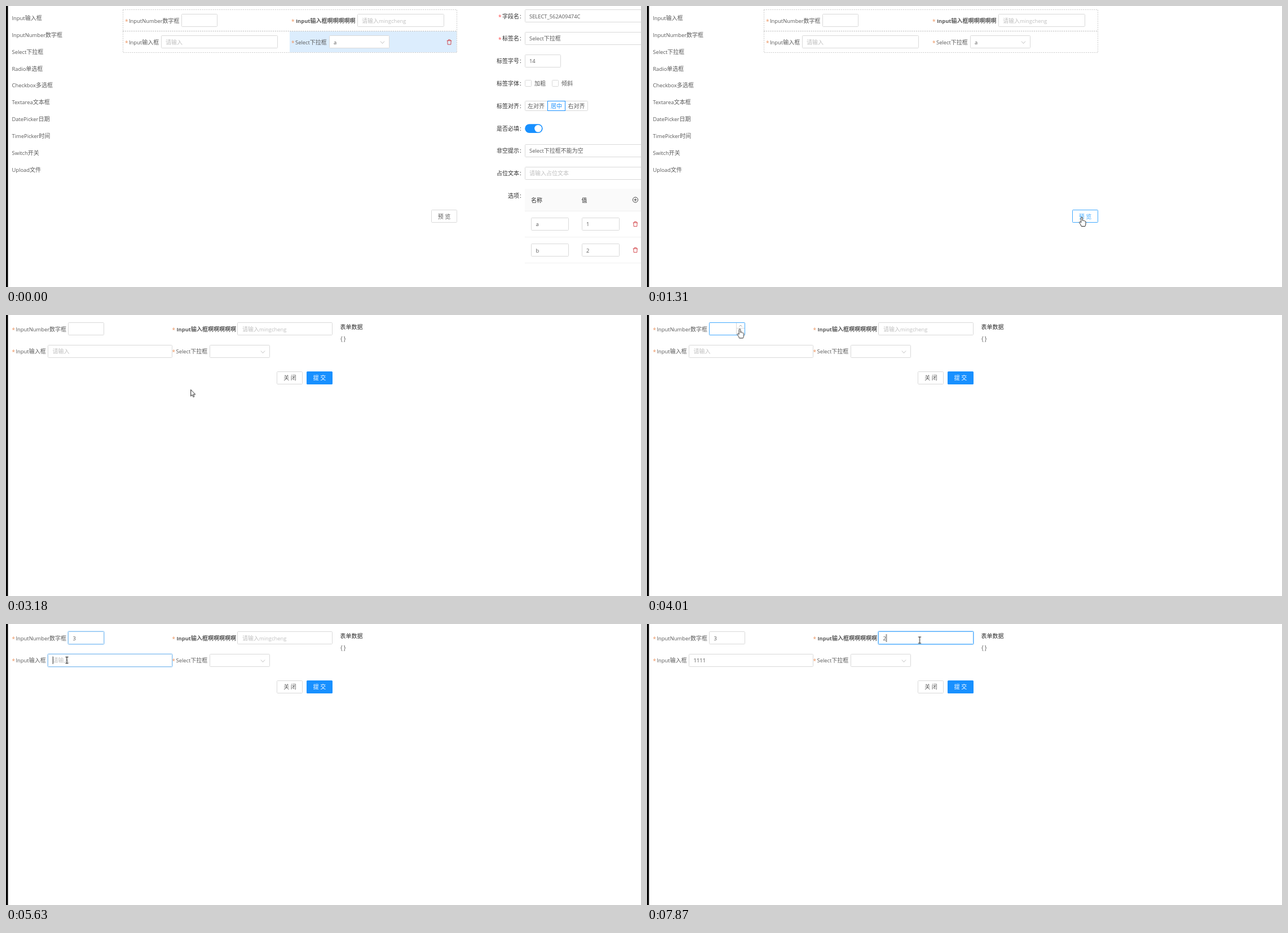
Recreate the animation shown at these times as an HTML page. Size 1126 by 498 pixels, loop 8000 ms.

```html
<!DOCTYPE html>
<html lang="zh-CN">
<head>
<meta charset="utf-8">
<title>Form designer</title>
<style>
html, body { margin: 0; width: 100%; height: 100%; overflow: hidden; background: #fff; }
svg { display: block; width: 1126px; height: 498px; }
text { font: 10px "Open Sans", "Noto Sans CJK SC", "Noto Sans CJK", sans-serif; fill: #595959; white-space: pre; }
.en { font-size: 9.4px; }
.box { fill: #fff; stroke: #d9d9d9; }
.hint { fill: #bfbfbf; }
.bold { font-weight: 700; }
.star { fill: #ec9460; }
.must { fill: #ff4d4f; }
.dark text, .dark { fill: #2c2c2c; }
.end { text-anchor: end; }
.mid { text-anchor: middle; }
.line { fill: none; stroke: #bfbfbf; }
.dash { fill: none; stroke: #cdcdcd; stroke-dasharray: 2.2 1.6; }
.bin { fill: none; stroke: #d0383e; stroke-width: .9; }
.hover { fill: none; stroke: #40a9ff; }
.focus rect { fill: none; stroke: #58b2fc; }
.focus rect + rect { stroke: #1890ff; stroke-opacity: .42; }
.caret { stroke: #333; }

/* One loop is 8 s, so 1% is 80 ms */
.a { animation: 8s step-end -8ms infinite; }
#panel { animation-name: panel; }
#editor { animation-name: editor; }
#preview { animation-name: preview; }
#btnHover { animation-name: btn-hover; }
#numHover { animation-name: num-hover; }
#numFocus { animation-name: num-focus; }
#numCaret { animation-name: num-caret; }
#spin { animation-name: spin; }
#one { animation-name: one; }
#two { animation-name: two; }
#three { animation-name: three; }
#hint1 { animation-name: hint1; }
#hover1 { animation-name: hover1; }
#focus1 { animation-name: focus1; }
#caret1 { animation-name: caret1; }
#key1 { animation-name: key1; }
#key2 { animation-name: key2; }
#key3 { animation-name: key3; }
#key4 { animation-name: key4; }
#hint2 { animation-name: hint2; }
#hover2 { animation-name: hover2; }
#focus2 { animation-name: focus2; }
#caret2 { animation-name: caret2; }
#value2 { animation-name: value2; }
#pointer { animation-name: move; }
#tap { animation-name: tap; }
#arrow { animation-name: arrow; }
#hand { animation-name: hand; }
#beam { animation-name: beam; }

@keyframes panel { 0% { opacity: 1 } 9.875%, 100% { opacity: 0 } }
@keyframes editor { 0% { opacity: 1 } 26.125%, 100% { opacity: 0 } }
@keyframes preview { 0% { opacity: 0 } 26.125%, 100% { opacity: 1 } }
@keyframes btn-hover { 0% { opacity: 0 } 16.375%, 100% { opacity: 1 } }
@keyframes num-hover { 0%, 57.875%, 100% { opacity: 0 } 42.625% { opacity: 1 } }
@keyframes num-focus {
  0%, 100% { opacity: 0 }
  57.875% { opacity: 1 }
  69.375% { opacity: 1; animation-timing-function: linear }
  72.25% { opacity: 0 }
}
@keyframes num-caret { 0%, 69.375%, 100% { opacity: 0 } 57.875% { opacity: 1 } }
@keyframes spin { 0%, 64.625%, 100% { opacity: 0 } 42.625% { opacity: 1 } }
@keyframes one { 0%, 59.75%, 100% { opacity: 0 } 57.875% { opacity: 1 } }
@keyframes two { 0%, 61.75%, 100% { opacity: 0 } 59.75% { opacity: 1 } }
@keyframes three { 0% { opacity: 0 } 61.75%, 100% { opacity: 1 } }
@keyframes hint1 { 0% { opacity: 1 } 75.125%, 100% { opacity: 0 } }
@keyframes hover1 { 0%, 69.375%, 100% { opacity: 0 } 66.5% { opacity: 1 } }
@keyframes focus1 {
  0%, 100% { opacity: 0 }
  69.375% { opacity: .3; animation-timing-function: linear }
  72.25% { opacity: 1 }
  94.5% { opacity: 1; animation-timing-function: linear }
  97.375% { opacity: 0 }
}
@keyframes caret1 {
  0%, 88.75%, 100% { opacity: 0 }
  69.375% { opacity: 1; transform: none }
  75.125% { opacity: 1; transform: translateX(5.3px) }
  78% { opacity: 1; transform: translateX(10.6px) }
  80.125% { opacity: 1; transform: translateX(16px) }
  82% { opacity: 1; transform: translateX(21.3px) }
}
@keyframes key1 { 0% { fill-opacity: 0 } 75.125%, 100% { fill-opacity: 1 } }
@keyframes key2 { 0% { fill-opacity: 0 } 78%, 100% { fill-opacity: 1 } }
@keyframes key3 { 0% { fill-opacity: 0 } 80.125%, 100% { fill-opacity: 1 } }
@keyframes key4 { 0% { fill-opacity: 0 } 82%, 100% { fill-opacity: 1 } }
@keyframes hint2 { 0% { opacity: 1 } 98.375%, 100% { opacity: 0 } }
@keyframes hover2 { 0%, 94.5%, 100% { opacity: 0 } 84.875% { opacity: 1 } }
@keyframes focus2 {
  0% { opacity: 0 }
  94.5% { opacity: .3; animation-timing-function: linear }
  97.375%, 100% { opacity: 1 }
}
@keyframes caret2 {
  0% { opacity: 0; transform: none }
  94.5% { opacity: 1; transform: none }
  98.375%, 100% { opacity: 1; transform: translateX(5.5px) }
}
@keyframes value2 { 0% { opacity: 0 } 98.375%, 100% { opacity: 1 } }

/* The pointer advances in discrete samples, as a screen recorder catches it */
@keyframes move {
  0%, .875% { transform: translate(991px, 446px); animation-timing-function: steps(3) }
  4.125% { transform: translate(643px, 278px) }
  9.625% { transform: translate(643px, 278px); animation-timing-function: steps(7) }
  16.375% { transform: translate(771px, 374px) }
  33% { transform: translate(771px, 374px); animation-timing-function: steps(10) }
  42.625% { transform: translate(137px, 28px) }
  45.625% { transform: translate(137px, 28px); animation-timing-function: steps(5) }
  50.125% { transform: translate(164.5px, 24.5px) }
  53% { transform: translate(164.5px, 24.5px); animation-timing-function: steps(3) }
  56% { transform: translate(166px, 22px) }
  62.625% { transform: translate(166px, 22px); animation-timing-function: steps(5) }
  67.5% { transform: translate(108px, 64px) }
  82% { transform: translate(108px, 64px); animation-timing-function: steps(2) }
  83.875% { transform: translate(454px, 22px) }
  86.75% { transform: translate(454px, 23px) }
  89.625% { transform: translate(454px, 23px); animation-timing-function: steps(2) }
  91.625%, 100% { transform: translate(483.5px, 28.5px) }
}
@keyframes tap {
  0%, 9.875%, 27.125%, 58.875%, 60.75%, 62.625%, 70.375%, 95.5%, 100% { opacity: 0 }
  8.75%, 25.25%, 57.875%, 59.75%, 61.75%, 68.5%, 93.5% { opacity: 1 }
}
@keyframes arrow { 0%, 16.375%, 42.625%, 100% { opacity: 0 } .875%, 27.125% { opacity: 1 } }
@keyframes hand { 0%, 27.125%, 63.625%, 100% { opacity: 0 } 16.375%, 49.25% { opacity: 1 } }
@keyframes beam { 0%, 49.25%, 75.125% { opacity: 0 } 42.625%, 63.625%, 83%, 100% { opacity: 1 } }
</style>
</head>
<body>
<svg viewBox="0 0 1126 498">
  <defs>
    <path id="bin" class="bin" d="M-4.2-2.5H4.2M-3.2-2.5L-2.8 4.2H2.8L3.2-2.5M-1.7-2.5V-4.3H1.7V-2.5"/>
    <path id="chevron" class="line" d="M-3.5-2L0 2L3.5-2"/>
  </defs>
  <rect width="3.5" height="498"/>

  <g id="editor" class="a">
    <text x="10.5" y="25"><tspan class="en">Input</tspan>输入框</text>
    <text x="10.5" y="54.9"><tspan class="en">InputNumber</tspan>数字框</text>
    <text x="10.5" y="84.7"><tspan class="en">Select</tspan>下拉框</text>
    <text x="10.5" y="114.5"><tspan class="en">Radio</tspan>单选框</text>
    <text x="10.5" y="144.4"><tspan class="en">Checkbox</tspan>多选框</text>
    <text x="10.5" y="174.2"><tspan class="en">Textarea</tspan>文本框</text>
    <text x="10.5" y="204.1"><tspan class="en">DatePicker</tspan>日期</text>
    <text x="10.5" y="234"><tspan class="en">TimePicker</tspan>时间</text>
    <text x="10.5" y="263.8"><tspan class="en">Switch</tspan>开关</text>
    <text x="10.5" y="293.6"><tspan class="en">Upload</tspan>文件</text>

    <g id="panel" class="a">
      <rect x="503" y="45" width="296" height="37" fill="#dcedfd"/>
      <use href="#bin" x="786" y="64"/>

      <g class="dark">
        <text class="end" x="910" y="21.5">字段名</text>
        <text class="end" x="910" y="61.3">标签名</text>
        <text class="end" x="910" y="101.1">标签字号</text>
        <text class="end" x="910" y="140.9">标签字体</text>
        <text class="end" x="910" y="180.7">标签对齐</text>
        <text class="end" x="910" y="220.5">是否必填</text>
        <text class="end" x="910" y="260.3">非空提示</text>
        <text class="end" x="910" y="300.1">占位文本</text>
        <text class="end" x="910" y="339.9">选项</text>
        <text y="21.5"><tspan x="911">:</tspan><tspan x="911" dy="39.8">:</tspan><tspan x="911" dy="39.8">:</tspan><tspan x="911" dy="39.8">:</tspan><tspan x="911" dy="39.8">:</tspan><tspan x="911" dy="39.8">:</tspan><tspan x="911" dy="39.8">:</tspan><tspan x="911" dy="39.8">:</tspan><tspan x="911" dy="39.8">:</tspan></text>
      </g>
      <text class="must" x="873" y="23">*</text>
      <text class="must" x="873" y="63">*</text>

      <rect class="box" x="920.5" y="6.5" width="220" height="22" rx="1"/>
      <text class="en" x="928" y="21.5">SELECT_562A09474C</text>
      <rect class="box" x="920.5" y="46.5" width="220" height="22" rx="1"/>
      <text x="928" y="61.3"><tspan class="en">Select</tspan>下拉框</text>
      <rect class="box" x="920.5" y="86.5" width="63" height="22" rx="1"/>
      <text class="en" x="928" y="101.3">14</text>

      <rect class="box" x="920.5" y="131.5" width="11" height="11" rx="1"/>
      <text x="937" y="141">加粗</text>
      <rect class="box" x="968.5" y="131.5" width="11" height="11" rx="1"/>
      <text x="985" y="141">倾斜</text>

      <rect class="box" x="920.5" y="168.5" width="111" height="17" rx="1"/>
      <rect class="box" x="960.5" y="168.5" width="31" height="17" style="stroke:#1890ff"/>
      <text x="925" y="180.7">左对齐</text>
      <text x="966" y="180.7" style="fill:#1890ff">居中</text>
      <text x="996.5" y="180.7">右对齐</text>

      <rect x="920.2" y="209.3" width="31.4" height="15.7" rx="7.85" fill="#1890ff"/>
      <circle cx="943.6" cy="217.1" r="6.4" fill="#fff"/>

      <rect class="box" x="920.5" y="245.5" width="220" height="22" rx="1"/>
      <text x="928" y="260.3"><tspan class="en">Select</tspan>下拉框不能为空</text>
      <rect class="box" x="920.5" y="285.5" width="220" height="22" rx="1"/>
      <text class="hint" x="928" y="300.1">请输入占位文本</text>

      <rect x="920" y="324" width="206" height="39" fill="#fafafa"/>
      <path d="M920 363.5H1126M920 409.5H1126M920 455.5H1126" stroke="#f0f0f0"/>
      <text class="dark" x="931" y="347.5">名称</text>
      <text class="dark" x="1020.5" y="347.5">值</text>
      <g fill="none" stroke="#444"><circle cx="1116" cy="343.5" r="4.6"/><path d="M1113.5 343.5H1118.5M1116 341V346"/></g>
      <rect class="box" x="931.5" y="375.5" width="66" height="22" rx="1"/>
      <rect class="box" x="1021.5" y="375.5" width="66" height="22" rx="1"/>
      <rect class="box" x="931.5" y="421.5" width="66" height="22" rx="1"/>
      <rect class="box" x="1021.5" y="421.5" width="66" height="22" rx="1"/>
      <text class="en" x="939.5" y="390.3">a</text>
      <text class="en" x="1029" y="390.3">1</text>
      <text class="en" x="939.5" y="436.5">b</text>
      <text class="en" x="1029" y="436.5">2</text>
      <use href="#bin" x="1116" y="386.5"/>
      <use href="#bin" x="1116" y="432.5"/>
    </g>

    <path class="dash" d="M207 6.5H799.5V82.5H207.5V6.5"/>
    <path class="dash" d="M207 44.5H799" style="stroke:#bbb"/>

    <text class="star" x="211" y="31">*</text>
    <text x="218" y="30"><tspan class="en">InputNumber</tspan>数字框</text>
    <rect class="box" x="311.5" y="14.5" width="63" height="22" rx="1"/>
    <text class="star" x="506" y="30.5">*</text>
    <text class="bold" x="514" y="29.5"><tspan class="en">Input</tspan>输入框啊啊啊啊啊</text>
    <rect class="box" x="623.5" y="14.5" width="153" height="22" rx="1"/>
    <text class="hint" x="631" y="29.5">请输入<tspan class="en">mingcheng</tspan></text>

    <text class="star" x="211" y="69">*</text>
    <text x="218" y="67.7"><tspan class="en">Input</tspan>输入框</text>
    <rect class="box" x="275.5" y="52.5" width="206" height="22" rx="1"/>
    <text class="hint" x="283" y="67.7">请输入</text>
    <text class="star" x="506" y="69">*</text>
    <text x="513" y="67.7"><tspan class="en">Select</tspan>下拉框</text>
    <rect class="box" x="573.5" y="52.5" width="106" height="22" rx="1"/>
    <text class="en" x="581" y="67.7">a</text>
    <use href="#chevron" x="667.5" y="64.5"/>

    <rect class="box" x="754.5" y="361.5" width="45" height="22" rx="1"/>
    <text class="mid" x="777" y="376.7">预 览</text>
    <g id="btnHover" class="a">
      <rect class="box" x="754.5" y="361.5" width="45" height="22" rx="1" style="stroke:#40a9ff"/>
      <text class="mid" x="777" y="376.7" style="fill:#40a9ff">预 览</text>
    </g>
  </g>

  <g id="preview" class="a">
    <text class="star" x="10.5" y="30">*</text>
    <text x="17.5" y="29.2"><tspan class="en">InputNumber</tspan>数字框</text>
    <rect class="box" x="110.5" y="13.5" width="63" height="22" rx="1"/>
    <g id="spin" class="a line">
      <path d="M158.5 14V35M158.5 23.5H173" stroke="#d9d9d9"/>
      <path d="M163.5 20.5L166 18L168.5 20.5M163.5 28.5L166 31L168.5 28.5" stroke="#999" stroke-width=".9"/>
    </g>
    <rect id="numHover" class="a hover" x="110.5" y="13.5" width="63" height="22" rx="1"/>
    <g id="numFocus" class="a focus">
      <rect x="110.5" y="13.5" width="63" height="22" rx="1"/>
      <rect x="109.5" y="12.5" width="65" height="24" rx="2"/>
    </g>
    <path id="numCaret" class="a caret" d="M124.5 18V32"/>
    <text id="one" class="a en" x="118.5" y="29.2">1</text>
    <text id="two" class="a en" x="118.5" y="29.2">2</text>
    <text id="three" class="a en" x="118.5" y="29.2">3</text>

    <text class="star" x="294.5" y="29.5">*</text>
    <text class="bold" x="302.5" y="28.7"><tspan class="en">Input</tspan>输入框啊啊啊啊啊</text>
    <rect class="box" x="410.5" y="13.5" width="168" height="22" rx="1"/>
    <rect id="hover2" class="a hover" x="410.5" y="13.5" width="168" height="22" rx="1"/>
    <g id="focus2" class="a focus">
      <rect x="410.5" y="13.5" width="168" height="22" rx="1"/>
      <rect x="409.5" y="12.5" width="170" height="24" rx="2"/>
    </g>
    <text id="hint2" class="a hint" x="419" y="28.7">请输入<tspan class="en">mingcheng</tspan></text>
    <text id="value2" class="a en" x="418.5" y="28.7">2</text>
    <path id="caret2" class="a caret" d="M419 18V32"/>

    <text class="star" x="10.5" y="69">*</text>
    <text x="17.5" y="68.2"><tspan class="en">Input</tspan>输入框</text>
    <rect class="box" x="74.5" y="53.5" width="220" height="22" rx="1"/>
    <rect id="hover1" class="a hover" x="74.5" y="53.5" width="220" height="22" rx="1"/>
    <g id="focus1" class="a focus">
      <rect x="74.5" y="53.5" width="220" height="22" rx="1"/>
      <rect x="73.5" y="52.5" width="222" height="24" rx="2"/>
    </g>
    <text id="hint1" class="a hint" x="82.5" y="68.2">请输入</text>
    <text class="en" x="82.5" y="68.2"><tspan id="key1" class="a">1</tspan><tspan id="key2" class="a">1</tspan><tspan id="key3" class="a">1</tspan><tspan id="key4" class="a">1</tspan></text>
    <path id="caret1" class="a caret" d="M83.2 57.5V71"/>

    <text class="star" x="294.5" y="69">*</text>
    <text x="301.5" y="68.2"><tspan class="en">Select</tspan>下拉框</text>
    <rect class="box" x="361.5" y="53.5" width="106" height="22" rx="1"/>
    <use href="#chevron" x="455.5" y="65.5"/>

    <rect class="box" x="480.5" y="100.5" width="45" height="22" rx="1"/>
    <text class="mid" x="503.5" y="115.3">关 闭</text>
    <rect x="533" y="100" width="46" height="23" rx="1.5" fill="#1890ff"/>
    <text class="mid" x="556" y="115.3" style="fill:#fff">提 交</text>

    <text class="dark" x="592.5" y="24.7">表单数据</text>
    <text x="593" y="46" style="letter-spacing:2px">{}</text>
  </g>

  <g id="pointer" class="a">
    <circle id="tap" class="a" cx="-1" cy="1" r="9.3" fill="#fbf000" fill-opacity=".68"/>
    <g fill="#fff" stroke="#111" stroke-width=".9" stroke-linejoin="round">
      <path id="arrow" class="a" d="M.5.5V12L3.1 9.6L4.9 13.6L6.7 12.8L4.9 8.9H8.5Z"/>
      <path id="hand" class="a" d="M-1.3 9.8V1.5Q-1.3.3 0 .3T1.3 1.5V6.3Q2.7 5.5 3.6 6.7Q5 6.1 5.6 7.4Q7 7.1 7 8.7V12Q7 14 5.8 16.5H-.8Q-1.5 14-3.6 11.2Q-5 9-3.8 8.6Q-2.6 8.2-1.3 9.8Z"/>
    </g>
    <path id="beam" class="a" d="M-2.5-5.5H2.5M0-5.5V5.5M-2.5 5.5H2.5" fill="none" stroke="#111"/>
  </g>
</svg>
</body>
</html>
```
